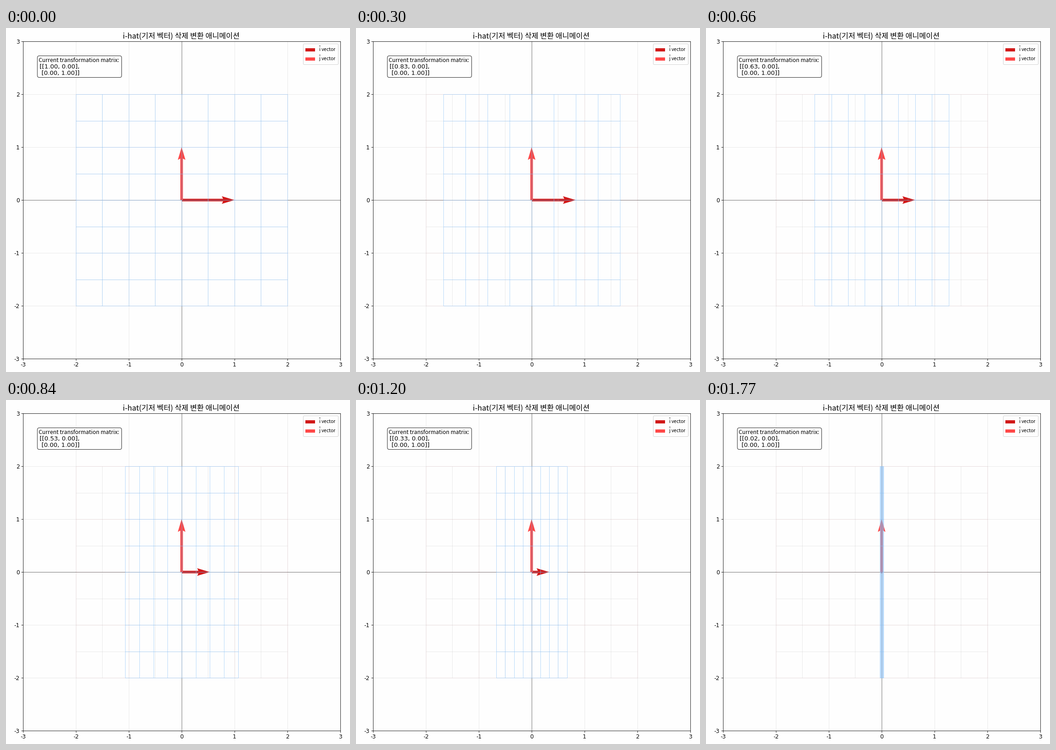
Animation of 748 by 748 pixels, one loop 1.8 s. Source, as a matplotlib script:

```python
import numpy as np
import matplotlib.pyplot as plt
from matplotlib.animation import FuncAnimation
from matplotlib.patches import FancyBboxPatch, Rectangle

SIZE = 748
FRAMES = 60
PX = 0.72  # points per pixel at 100 dpi
SANS, CJK = "DejaVu Sans", "Noto Sans CJK JP"
PAPER = "#fefefe"
I_COLOR, J_COLOR, GRID_COLOR = "#d11919", "#ff4848", "#8cc3f8"
COORDS = np.arange(-2, 2.01, 0.5)

plt.rcParams["axes.unicode_minus"] = False
fig = plt.figure(figsize=(SIZE / 100, SIZE / 100), dpi=100, facecolor=PAPER)

ax = fig.add_axes([36.9 / SIZE, 28.9 / SIZE, 690 / SIZE, 690 / SIZE],
                  facecolor=PAPER)
ax.set(xlim=(-3, 3), ylim=(-3, 3))
ax.set_xticks(range(-3, 4))
ax.set_yticks(range(-3, 4))
ax.tick_params(length=3.6 * PX, width=0.83 * PX, pad=3.6 * PX,
               labelsize=12 * PX, labelfontfamily=SANS)
ax.grid(True, color="#b0b0b0", alpha=0.3, lw=0.83 * PX)
for spine in ax.spines.values():
    spine.set_linewidth(0.83 * PX)

# Pixel-space layer for title, info box and legend
hud = fig.add_axes([0, 0, 1, 1], zorder=5)
hud.set(xlim=(0, SIZE), ylim=(SIZE, 0))
hud.axis("off")


def label(x, y, text, px, font=CJK, ha="left"):
    return hud.text(x, y, text, fontsize=px * PX, family=font,
                    ha=ha, va="baseline", color="black")


def box(x0, y0, x1, y1, radius, edge):
    hud.add_patch(FancyBboxPatch(
        (x0, y0), x1 - x0, y1 - y0, fc=PAPER, ec=edge, alpha=0.8,
        lw=1.04 * PX, boxstyle=f"round,pad=0,rounding_size={radius}"))


def grid_lines(color, alpha):
    style = dict(color=color, alpha=alpha, lw=PX, solid_capstyle="butt")
    cols = [ax.plot([c, c], [-2, 2], **style)[0] for c in COORDS]
    rows = [ax.plot([-2, 2], [c, c], **style)[0] for c in COORDS]
    return cols, rows


def arrow(x, y, color):
    return ax.quiver(0, 0, x, y, color=color, angles="xy",
                     scale_units="xy", scale=1, width=0.008, zorder=1)


# Axes and the untransformed grid
ax.axhline(0, color="black", alpha=0.5, lw=PX)
ax.axvline(0, color="black", alpha=0.5, lw=PX)
for group in grid_lines("#b0b0b0", 0.25):
    for line, c in zip(group, COORDS):
        if c == int(c):
            line.set(color="#d8808c", alpha=0.13)

i_arrow = arrow(1, 0, I_COLOR)
j_arrow = arrow(0, 1, J_COLOR)
cols, rows = grid_lines(GRID_COLOR, 0.6)

label(381, 22.5, "i-hat(기저 벡터) 삭제 변환 애니메이션", 16.2, ha="center")

box(68.2, 60.5, 251.5, 107.5, 4.2, "black")
label(71.5, 74, "Current transformation matrix:", 12.1)
row_i = label(73, 88, "", 13.3, SANS)
label(73, 102, " [0.00, 1.00]]", 13.3, SANS)

box(646.5, 34.5, 722.5, 79.5, 2.1, "#cccccc")
for y, name, color in ((47.5, "i", I_COLOR), (67.5, "j", J_COLOR)):
    hud.add_patch(Rectangle((651, y - 3.5), 21, 7, fc=color, lw=0))
    label(680, y + 3, rf"$\hat{{\mathrm{{{name}}}}}$ vector", 10.3)


def update(frame):
    a = 1 - frame / FRAMES
    for line, c in zip(cols, COORDS):
        line.set_xdata([a * c, a * c])
    for line in rows:
        line.set_xdata([-2 * a, 2 * a])
    i_arrow.set_UVC(a, 0)
    row_i.set_text(f"[[{a:.2f}, 0.00],")
    return [*cols, *rows, i_arrow, row_i]


anim = FuncAnimation(fig, update, frames=FRAMES, interval=30,
                     repeat=True, repeat_delay=0, blit=False)
plt.show()
```
